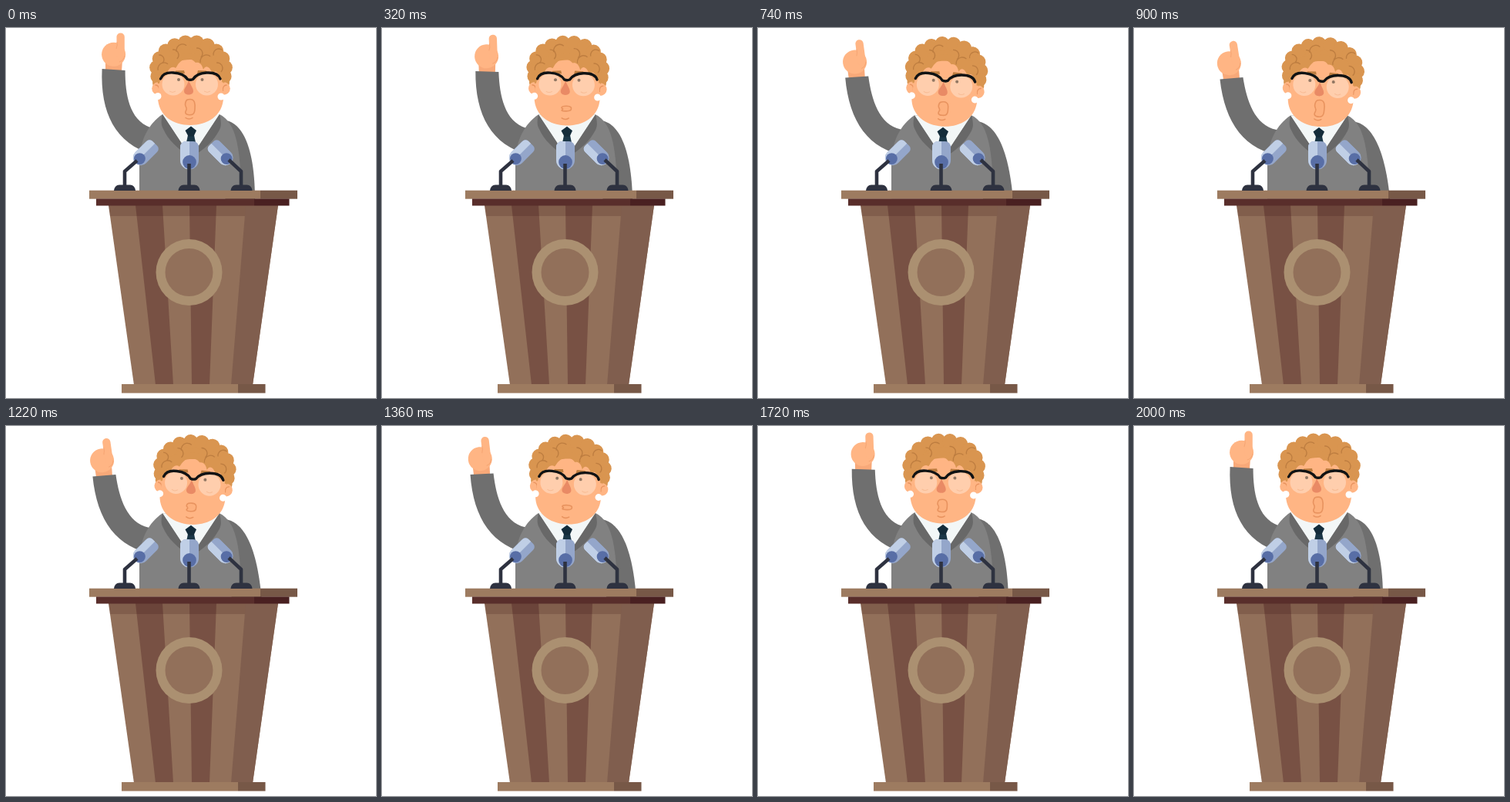
An HTML page with a canvas that plays this animation: 480 by 480 pixels, repeating every 2020 ms.

```html
<!DOCTYPE html>
<html lang="en">
<head>
<meta charset="utf-8">
<title>Speaker at the lectern</title>
<style>
html, body { margin: 0; width: 100%; height: 100%; overflow: hidden; background: #fff; }
canvas { display: block; width: 480px; height: 480px; }
</style>
</head>
<body>
<canvas id="stage" width="480" height="480"></canvas>
<script>
const ctx = document.getElementById('stage').getContext('2d');
const LOOP = 2020;
const SKIN = '#ffb584', SKIN_LINE = '#e8935f', HAIR = '#d99550', CURL = '#bd7d40';
const SLEEVE = '#6f6f6f', JACKET = '#818181', LAPEL = '#686868';
const WOOD = '#92705a', WOOD_DARK = '#785144', WOOD_SIDE = '#805e4e';
const BOARD = '#9d7b60', BOARD_DARK = '#775847', METAL = '#2e3240';

function shape(d, fill, stroke, width = 1.5) {
  const path = new Path2D(d);
  if (fill) { ctx.fillStyle = fill; ctx.fill(path); }
  if (stroke) { ctx.strokeStyle = stroke; ctx.lineWidth = width; ctx.stroke(path); }
}

function disc(x, y, r, fill) {
  ctx.beginPath();
  ctx.arc(x, y, r, 0, Math.PI * 2);
  ctx.fillStyle = fill;
  ctx.fill();
}

function rect(x, y, w, h, fill) {
  ctx.fillStyle = fill;
  ctx.fillRect(x, y, w, h);
}

function pill(x, y, w, h, r, fill) {
  ctx.beginPath();
  ctx.roundRect(x, y, w, h, r);
  ctx.fillStyle = fill;
  ctx.fill();
}

function turned(x, y, angle, draw) {
  ctx.save();
  ctx.translate(x, y);
  ctx.rotate(angle);
  ctx.translate(-x, -y);
  draw();
  ctx.restore();
}

function raisedArm() {
  shape('M129 42 L151 42 L150 56 L129 56 Z', '#f8a979');
  disc(139.6, 34.3, 15.5, SKIN);
  pill(143.5, 6.5, 10.3, 34, 5, SKIN);
  shape('M143 27 Q145 22 144 18 M147 44 Q153 42 154 36', null, 'rgba(232,147,95,.45)', 1);
  shape('M124.6 53 L154.6 55 C154.6 86 160 119 187 129 L205 144 L190 164 C142 150 122 110 124.6 53 Z', SLEEVE);
}

function loweredArm() {
  shape('M270 122 L288 120.5 C305 126 323 150 323 225 L285 225 Z', SLEEVE);
}

function torso() {
  shape('M173 220 L173 172 C174 145 185 124 203 112 L277 112 C295 121 305 145 305 220 Z', JACKET);
  shape('M203 112 L277 112 L240 168 Z', '#f3f7f7');
  shape('M203 112 C201 120 201 126 204 131 C210 145 222 156 240 168 Z', LAPEL);
  shape('M277 112 C279 121 280 126 277 132 C270 146 258 157 240 168 Z', LAPEL);
  shape('M236 139 L244 139 L248 158 L240 165 L232 158 Z', '#1b3747');
  shape('M240 127.5 L247 133 L243.5 140.5 L236.5 140.5 L232.5 133 Z', '#142c3a');
}

function hair() {
  const n = 12;
  shape('M194 72 C189 38 208 18 240 18 C272 18 291 38 286 72 Z', HAIR);
  for (let i = 0; i < n; i++) {
    const a = Math.PI * (0.92 + 1.16 * i / (n - 1));
    disc(240 + 44.5 * Math.cos(a), 54 + 35.5 * Math.sin(a), 9.5, HAIR);
  }
  disc(197, 71, 7, HAIR);
  disc(283, 71, 7, HAIR);
}

function curls() {
  const spots = [[205, 53, 8], [217, 35, 7], [229, 29, 8], [248, 33, 7],
    [260, 43, 8], [274, 52, 7], [276, 34, 7], [199, 41, 6]];
  ctx.strokeStyle = CURL;
  ctx.lineWidth = 1.3;
  spots.forEach(([x, y, r], i) => {
    const start = i % 2 ? -1.7 : 2.9;
    ctx.beginPath();
    ctx.arc(x, y, r, start, start + 2.5);
    ctx.stroke();
  });
}

function mouth(open) {
  const top = 101.5 - 10 * open, low = 107 + 6.3 * open;
  const mid = (top + low) / 2, h = (low - top) / 2;
  shape(`M232.5 ${mid - h * 0.35}
    C233 ${top} 236 ${top} 239 ${top}
    C245 ${top} 245.5 ${mid - h * 0.4} 245 ${mid + h * 0.2}
    C245 ${low} 241 ${low} 238 ${low}
    C233 ${low} 231.5 ${mid + h * 0.75} 234 ${mid + h * 0.35}
    C235 ${mid} 232.5 ${mid} 232.5 ${mid - h * 0.35} Z`, '#fdb07d', SKIN_LINE, 1.6);
}

function head(open) {
  hair();
  for (const [x, s] of [[197.5, -1], [282.5, 1]]) {
    disc(x, 78.5, 8.3, SKIN);
    shape(`M${x + 4 * s} 74 q${-6 * s} 0 ${-5 * s} 8`, null, SKIN_LINE, 1.3);
  }
  shape('M199 67 C200 52 215 42 239 41 C263 42 278 52 280 67 L282 91 C281 114 261 126 239 126 C217 126 198 114 197 91 Z', SKIN);
  shape('M197 72 L195 47 L214 36 L238 32 L263 36 L284 48 L283 72 L277 63 C274 56 271 54 268 60 C265 50 259 47 256 54 C254 46 250 44 246 45 C240 38 231 38 225 45 C222 48 222 50 220 52 C216 49 211 52 209 59 C205 58 201 62 199 72 Z', HAIR);
  curls();
  disc(197, 88.5, 4.5, '#fff');
  disc(279, 89, 4.5, '#fff');

  shape('M219 59 L220 55.5 L231 55 L232 59 Z M248 59 L249 55 L260 55.5 L261 59 Z', CURL);
  disc(217, 73, 14.5, 'rgba(255,235,222,.46)');
  disc(260.5, 73, 14.5, 'rgba(255,235,222,.46)');
  disc(224, 67, 2, '#917763');
  disc(254.5, 67, 2, '#917763');
  shape('M212 82 q4 3 8 0 M257 82 q4 3 8 0', null, 'rgba(232,147,95,.3)', 1);
  shape('M237 68 C240 75 243 78 243 82 C243 88 231 88 231 82 C231 78 235 75 237 68 Z', '#e98a65');
  ctx.lineCap = 'round';
  shape('M200.5 66 C203 59.5 210 57.5 217 58 C226 58.5 232 61 235.5 66.5 Q239 68 242.5 66.5 C246 61 252 58.5 260 58 C269 57.5 276 60 278 66', null, '#101314', 3.4);
  mouth(open);
  shape('M233 116.5 Q237.5 119.5 242 116.5', null, SKIN_LINE, 1.5);
  ctx.lineCap = 'butt';
}

function lectern() {
  shape('M133 230 L353 230 L320 463 L166 463 Z', WOOD);
  shape('M168 230 L203 230 L217 463 L194 463 Z M238 230 L273 230 L264 463 L241 463 Z', WOOD_DARK);
  shape('M133 230 L312 230 L311 244 L135 244 Z', 'rgba(50,15,15,.18)');
  shape('M311 230 L353 230 L320 463 L292 463 Z', WOOD_SIDE);
  rect(108, 210.7, 222, 11, BOARD);
  rect(330, 210.7, 48, 11, BOARD_DARK);
  rect(117, 221.5, 205, 9, '#592e2b');
  rect(322, 221.5, 45.5, 9, '#492021');
  rect(150, 462, 151, 11.6, BOARD);
  rect(301, 462, 35.5, 11.6, BOARD_DARK);
  disc(237.5, 317, 43, '#ab9071');
  disc(237.5, 317, 31, WOOD);
}

function stand(x, stem) {
  shape(stem, null, METAL, 4.6);
  shape(`M${x - 14} 211 Q${x - 13} 203.5 ${x - 7} 203.5 L${x + 7} 203.5 Q${x + 13} 203.5 ${x + 14} 211 Z`, METAL);
}

function capsule(x, y, w, h, angle) {
  turned(x, y, angle, () => {
    const left = x - w / 2, top = y - h / 2;
    ctx.save();
    ctx.beginPath();
    ctx.roundRect(left, top, w, h, [w * 0.3, w * 0.3, w * 0.5, w * 0.5]);
    ctx.clip();
    rect(left, top, w, h, '#94a6ca');
    rect(left, top, w / 2, h, '#c0cfe6');
    ctx.restore();
    disc(x, top + h - w * 0.4, w * 0.37, '#586ea6');
  });
}

function microphones() {
  ctx.lineJoin = 'round';
  capsule(180.5, 162.5, 20, 36, Math.PI / 4);
  capsule(279, 162.5, 20, 36, -Math.PI / 4);
  capsule(238, 165.3, 24, 36.5, 0);
  stand(154, 'M170 172 L154 186 L154 207');
  stand(305.5, 'M289 171 L305 186 L305 207');
  stand(237.5, 'M237.5 176 L237.5 207');
}

function draw(t) {
  const sway = (1 - Math.cos(2 * Math.PI * t / LOOP)) / 2;
  const open = (1 - Math.cos(4 * Math.PI * (t - 405) / LOOP)) / 2;
  rect(0, 0, 480, 480, '#fff');
  turned(300, 130, -0.1 * sway, loweredArm);
  turned(205, 144, -0.16 * sway, raisedArm);
  ctx.save();
  ctx.translate(0, 1.5 * sway);
  torso();
  ctx.restore();
  turned(211, 130, 0.07 * sway, () => head(open));
  lectern();
  microphones();
}

const begin = performance.now();
function tick() {
  draw((performance.now() - begin) % LOOP);
  requestAnimationFrame(tick);
}
tick();
</script>
</body>
</html>
```
